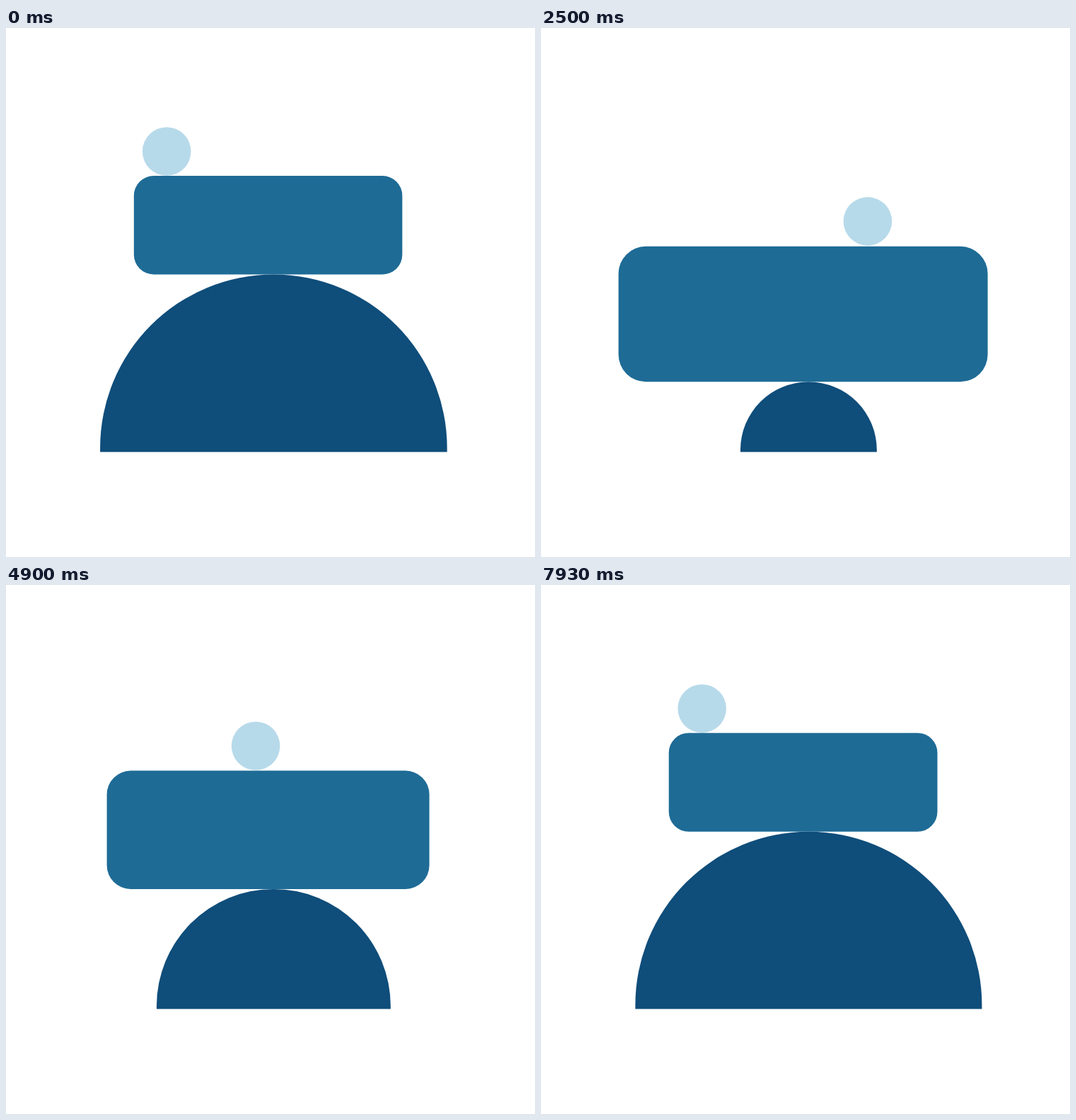
Write an HTML page that moves like this. It is 748 by 748 pixels and loops after 8.01 s.

```html
<!DOCTYPE html>
<html lang="en">
<head>
<meta charset="utf-8">
<title>Balancing shapes</title>
<style>
  html, body { margin: 0; width: 100%; height: 100%; overflow: hidden; background: #fff; }
  svg { display: block; width: 100%; height: 100%; }
</style>
</head>
<body>
<svg viewBox="0 0 748 748">
  <path id="dome" fill="#0f4d7a"/>
  <rect id="slab" fill="#1e6b96"/>
  <circle id="ball" r="34.3" fill="#b7daea"/>
</svg>
<script>
const LOOP = 8010, HALF = 2000;
const [dome, slab, ball] = ['dome', 'slab', 'ball'].map(id => document.getElementById(id));
const mix = (a, b, p) => a + (b - a) * p;

function set(el, attrs) {
  for (const name in attrs) el.setAttribute(name, attrs[name]);
}

// Cubic Bezier easing with control points (x1, 0) and (x2, 1)
function ease(u, x1, x2) {
  let low = 0, high = 1;
  for (let i = 0; i < 24; i++) {
    const s = (low + high) / 2, r = 1 - s;
    if (3 * r * r * s * x1 + 3 * r * s * s * x2 + s * s * s < u) low = s;
    else high = s;
  }
  return low * low * (3 - 2 * low);
}

// Poses advance by 50 ms but are shown for 30 and 70 ms in turn
function poseTime(t) {
  const step = 2 * Math.floor(t / 100) + (t % 100 >= 30 ? 1 : 0);
  return Math.min(step, 159) * 50 % (2 * HALF);
}

function draw(now) {
  const t = poseTime(now % LOOP);
  const p = t < HALF ? ease(t / HALF, .35, .586) : 1 - ease(t / HALF - 1, .364, .636);

  set(ball, { cx: mix(227.2, 502.2, p), cy: mix(174.5, 290.3, p) });

  const top = mix(209, 326, p), seam = mix(348.5, 526.3, p), width = mix(379.5, 546.5, p);
  set(slab, {
    x: 370.6 - width / 2, y: top, width, height: seam - top,
    rx: mix(28, 40.3, p)
  });

  const r = mix(245.3, 70.9, p), left = 378.4 - r;
  set(dome, { d: `M${left} 599.5V${seam + r}a${r} ${r} 0 0 1 ${2 * r} 0V599.5Z` });
}

const start = performance.now();
function tick() {
  draw(performance.now() - start);
  requestAnimationFrame(tick);
}
tick();
</script>
</body>
</html>
```
